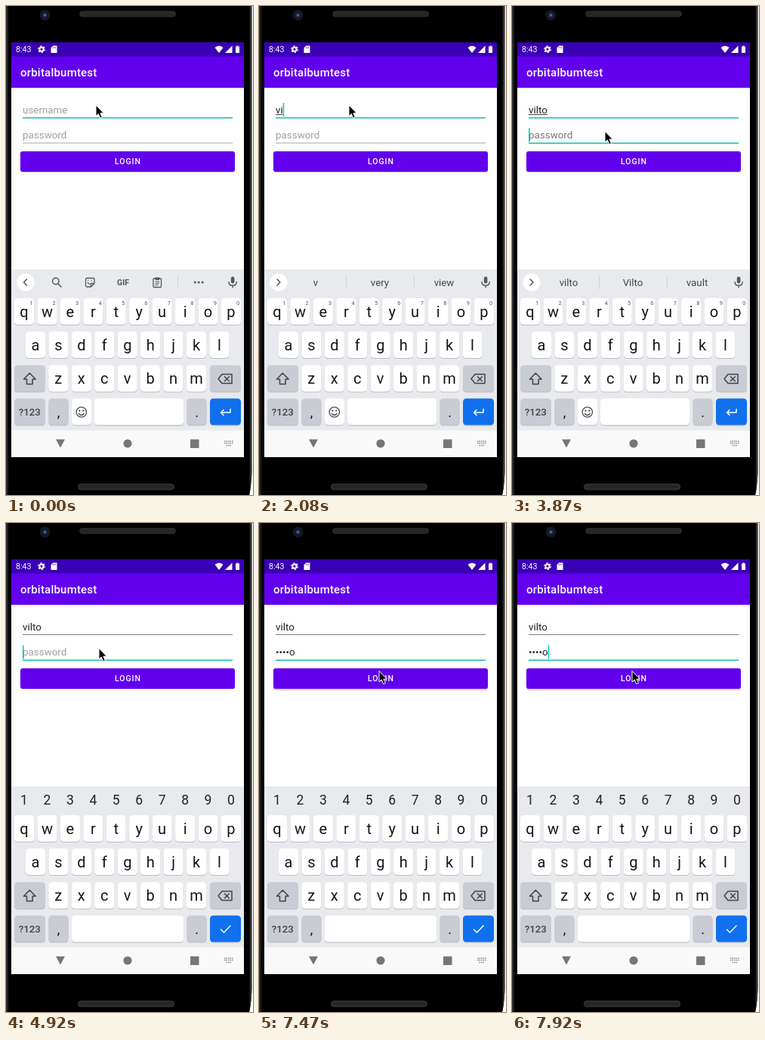
Write an HTML page that moves like this. It is 327x646 px and loops after 8 s.

```html
<!DOCTYPE html>
<html lang="en">
<head>
<meta charset="utf-8">
<title>Login</title>
<style>
  html, body { margin: 0; width: 100%; height: 100%; overflow: hidden; background: #fff; }
  svg { display: block; width: 327px; height: 646px; font-family: Roboto, "Open Sans", sans-serif; }
  .line { fill: none; stroke-linecap: round; stroke-linejoin: round; }
</style>
</head>
<body>
<svg id="stage" viewBox="0 0 327 646" xmlns="http://www.w3.org/2000/svg">
  <defs>
    <linearGradient id="edge">
      <stop offset="0" stop-color="#050505"/>
      <stop offset=".6" stop-color="#3c3c3e"/>
      <stop offset="1" stop-color="#8c8c8e"/>
    </linearGradient>
    <linearGradient id="rim">
      <stop offset="0" stop-color="#3a3a3c"/>
      <stop offset="1" stop-color="#000"/>
    </linearGradient>
    <radialGradient id="lens">
      <stop offset="0" stop-color="#7d9be0"/>
      <stop offset=".35" stop-color="#2b3f7c"/>
      <stop offset="1" stop-color="#0c1020"/>
    </radialGradient>
    <pattern id="mesh" width="2" height="2" patternUnits="userSpaceOnUse">
      <rect width="2" height="2" fill="#2b2b2b"/>
      <rect width="1" height="1" fill="#191919"/>
    </pattern>
  </defs>

  <!-- phone body -->
  <path d="M0 0H326V606Q325 634 322 646H0Z" fill="#000"/>
  <path d="M322 0H326V606Q325 634 322 646Z" fill="url(#edge)"/>
  <rect width="4" height="646" fill="url(#rim)"/>
  <rect x="97.500" y="7" width="127" height="7" rx="3.500" fill="url(#mesh)" stroke="#333" stroke-width=".8"/>
  <rect x="95.500" y="631.500" width="127" height="7.500" rx="3.700" fill="url(#mesh)" stroke="#444" stroke-width=".8"/>
  <circle cx="51.500" cy="12" r="7" fill="#17181c"/>
  <circle cx="51.500" cy="12" r="4" fill="url(#lens)"/>

  <!-- screen -->
  <rect x="7" y="48" width="308" height="548" fill="#fefefe"/>
  <rect x="7" y="108" width="308" height="1.500" fill="#000" opacity=".1"/>
  <rect x="7" y="66" width="308" height="42" fill="#6200ee"/>
  <rect x="7" y="48" width="308" height="18.500" fill="#3a00b4"/>
  <g fill="#fff">
    <text x="13" y="61" font-size="10.600">8:43</text>
    <circle cx="47" cy="57.200" r="2.600" fill="none" stroke="#fff" stroke-width="2"/>
    <circle cx="47" cy="57.200" r="4.200" fill="none" stroke="#fff" stroke-width="1.400" stroke-dasharray="2.200 2.200"/>
    <path d="M62.300 52.500H67.500V62H59.500V55.300Z"/>
    <path d="M276.500 55Q282 50.500 287.500 55L282 62Z"/>
    <path d="M299.500 52.500V62H290Z"/>
    <path d="M304 53.500H305.500V52.500H307.500V53.500H309V62H304Z"/>
    <text x="19" y="93" font-size="15" font-weight="500" letter-spacing=".2">orbitalbumtest</text>
  </g>
  <path d="M62 54.300V56M63.800 54.300V56M65.600 54.300V56" stroke="#3a00b4" stroke-width=".7"/>

  <!-- form -->
  <g font-size="13.400">
    <text id="user" x="22" y="141.500"></text>
    <text id="pass" x="22" y="175"></text>
  </g>
  <rect id="spell" x="22" y="143" height="1" fill="#444"/>
  <rect id="userLine" x="22" width="278"/>
  <rect id="passLine" x="22" width="278"/>
  <rect id="caret" width="1.500" height="18" fill="#03cdba"/>
  <rect id="shade" x="19" y="193" width="284" height="27" rx="3" fill="#000" opacity=".16"/>
  <rect x="19" y="192" width="284" height="27" rx="3" fill="#6200ee"/>
  <text x="144" y="209.300" font-size="10.500" font-weight="500" letter-spacing=".95" fill="#fff">LOGIN</text>

  <!-- keyboard -->
  <rect x="7" y="348" width="308" height="213" fill="#e8eaed"/>
  <g id="keys"></g>
  <g id="textKeys">
    <g class="line" stroke="#4a4d51" stroke-width="1.300">
      <circle cx="99.800" cy="536.500" r="6.700"/>
      <path d="M96.300 538.500Q99.800 542.500 103.300 538.500"/>
      <path d="M97.400 534.300V534.700M102.200 534.300V534.700" stroke-width="2"/>
    </g>
    <path class="line" d="M297 532.500V537H284.500M288 533.500L284.500 537L288 540.500" stroke="#fff" stroke-width="1.500"/>
    <circle cx="26" cy="365" r="11.500" fill="#fff"/>
    <path id="chevron" class="line" stroke="#444" stroke-width="1.300"/>
    <g fill="#55585c">
      <rect x="297.800" y="357.500" width="4.600" height="9" rx="2.300"/>
      <path class="line" d="M295 364.500Q295 369.300 300.100 369.300T305.200 364.500M300.100 369.500V372" stroke="#55585c" stroke-width="1.400"/>
    </g>
  </g>
  <g id="tools" fill="#55585c">
    <g class="line" stroke="#55585c" stroke-width="1.500">
      <circle cx="65.800" cy="363.500" r="4.200"/>
      <path d="M69 367L73 371"/>
      <path d="M107 359.500H115.500Q117 359.500 117 361V366.500L112.500 371H107Q105.500 371 105.500 369.500V361Q105.500 359.500 107 359.500ZM117 366.500H112.500V371" stroke-width="1.300"/>
      <path d="M108.300 365.500Q109.500 367.500 111.500 367M108.800 362.500V362.700M113.300 362.500V362.700" stroke-width="1.200"/>
      <rect x="195" y="360" width="10.500" height="11.500" rx="1" stroke-width="1.300"/>
      <path d="M197.800 364H202.700M197.800 366.300H202.700M197.800 368.600H201" stroke-width="1"/>
    </g>
    <rect x="197.300" y="358.500" width="6" height="3.500" rx="1"/>
    <text x="155" y="368.700" font-size="10.500" font-weight="700" text-anchor="middle">GIF</text>
    <rect x="227" y="356.500" width="1" height="17" fill="#d0d2d6"/>
    <circle cx="250.300" cy="365" r="1.500"/><circle cx="255.200" cy="365" r="1.500"/><circle cx="260.100" cy="365" r="1.500"/>
  </g>
  <g id="hints" font-size="13.300" fill="#45484c" text-anchor="middle">
    <rect x="115" y="356" width="1" height="18" fill="#d0d2d6"/>
    <rect x="205" y="356" width="1" height="18" fill="#d0d2d6"/>
    <text x="75" y="370"></text><text x="160" y="370"></text><text x="245" y="370"></text>
  </g>
  <g id="digits" font-size="17.500" fill="#222" text-anchor="middle"></g>
  <path id="check" class="line" d="M284.500 537L288.500 541L297 532" stroke="#fff" stroke-width="1.500"/>

  <!-- navigation -->
  <rect x="7" y="560.500" width="308" height="35.500" fill="#f9f9fa"/>
  <g fill="#747678">
    <path d="M66 572.500H78L72 583.500Z"/>
    <circle cx="161" cy="578" r="5.600"/>
    <rect x="244" y="572.500" width="11.500" height="11.500" rx=".6"/>
    <path d="M289 575H300.500M289 577.500H300.500M291.500 580.500H298" stroke="#888" stroke-width="1.500" stroke-dasharray="1.500 1"/>
  </g>

  <path id="mouse" d="M0 0V14.500L3.300 11.500L5.700 17.200L8.300 16.100L5.900 10.600H10.400Z" fill="#000" stroke="#fff" stroke-width="1"/>
</svg>
<script>
const LOOP = 8000;
const TEAL = "#1bbcab";
const NAME = "vilto";
const DOT = "\u2022";
const PITCH = 30.44;
const $ = id => document.getElementById(id);

function add(parent, tag, attrs, text) {
  const el = document.createElementNS("http://www.w3.org/2000/svg", tag);
  set(el, attrs);
  if (text) el.textContent = text;
  parent.appendChild(el);
  return el;
}
function set(el, attrs) {
  for (const k in attrs) el.setAttribute(k, attrs[k]);
}
const show = (el, on) => el.setAttribute("visibility", on ? "visible" : "hidden");

function key(x, y, w, fill = "#fff", parent = $("keys")) {
  add(parent, "rect", { x, y: y + 1, width: w, height: 35, rx: 4.5, fill: "#b9bcc1" });
  add(parent, "rect", { x, y, width: w, height: 35, rx: 4.5, fill });
}
function label(x, y, text, size = 20, fill = "#151515", weight = 400) {
  add($("keys"), "text", { x, y, "font-size": size, fill, "font-weight": weight, "text-anchor": "middle" }, text);
}

function buildKeys() {
  const sup = add($("textKeys"), "g", { "font-size": 7.6, fill: "#55585c", "text-anchor": "middle" });
  [["qwertyuiop", 24, 386], ["asdfghjkl", 39, 430], ["zxcvbnm", 69.3, 474.5]].forEach(([row, x0, y], r) => {
    [...row].forEach((ch, i) => {
      const x = x0 + i * PITCH;
      key(x - 13, y, 26);
      label(x, y + 24.5, ch);
      if (r) return;
      const digit = (i + 1) % 10;
      add(sup, "text", { x: x + 9.3, y: 395 }, String(digit));
      add($("digits"), "text", { x, y: 372 }, String(digit));
    });
  });
  const grey = "#c9ccd2";
  key(11, 474.5, 41, grey);
  key(270, 474.5, 41, grey);
  key(11, 518.5, 41, grey);
  key(56.5, 518.5, 26, grey);
  key(87, 518.5, 148);
  key(239.5, 518.5, 26, grey);
  key(270, 518.5, 41, "#1070ee");
  label(31.3, 541, "?123", 13.3, "#404347", 500);
  label(69.5, 543, ",", 18);
  label(252.5, 543, ".", 18);
  const icon = { class: "line", stroke: "#404347", "stroke-width": 1.5 };
  add($("keys"), "path", { ...icon, d: "M31.3 485L23.500 493H27.500V499.500H35.100V493H39.100Z" });
  add($("keys"), "path", { ...icon, d: "M286 486.500H299V498.500H286L281 492.500ZM289.500 489.700L295.300 495.500M295.300 489.700L289.500 495.500" });
  // gap between emoji key and short space bar
  const gap = document.createElementNS("http://www.w3.org/2000/svg", "g");
  $("textKeys").prepend(gap);
  add(gap, "rect", { x: 86, y: 518, width: 40, height: 37, fill: "#e8eaed" });
  key(87, 518.5, 26, "#fff", gap);
  key(117, 518.5, 118, "#fff", gap);
}

// last entry whose start time has passed
const at = (steps, t) => steps.reduce((v, [start, next]) => t >= start ? next : v, steps[0][1]);

const typed = [[0, 0], [1930, 1], [2080, 2], [2530, 3], [2680, 4], [2830, 5]];
const secret = [[0, 0], [5820, 1], [6120, 2], [6270, 3], [6420, 4], [6870, 5]];
const words = [
  [0, ""], [2080, "v very view"], [2230, "vi via visit"],
  [2680, "vol Vol volt"], [2980, "volt Volt volts"], [3130, "vilto Vilto vault"]
];
const caretOn = [
  [0, false], [440, true], [1030, false], [1480, true], [3420, false], [3870, true],
  [4470, false], [4920, true], [5370, false], [5820, true], [7320, false], [7770, true]
];
const mouse = [[0, [119, 131]], [3420, [121, 150]], [3570, [123, 165.5]], [7320, [141, 180]], [7470, [159, 195.5]]];

function field(el, text, hint, hintFill) {
  el.textContent = text || hint;
  el.setAttribute("fill", text ? "#222" : hintFill);
  return text ? el.getComputedTextLength() : 0;
}

function draw(t) {
  const onPass = t >= 3870;
  const secure = t >= 4020;
  const n = at(secret, t);
  const userW = field($("user"), NAME.slice(0, at(typed, t)), "username", "#a0a0a0");
  const passW = field($("pass"), n ? DOT.repeat(n - 1) + NAME[n - 1] : "", "password",
    onPass && t < 4920 ? "#777" : "#a0a0a0");

  set($("spell"), { width: secure ? 0 : userW });
  set($("userLine"), { y: 147, height: secure ? 1 : 1.5, fill: secure ? "#808080" : TEAL });
  set($("passLine"), { y: 180.5, height: onPass ? 1.5 : 1, fill: onPass ? TEAL : "#a8a8a8" });
  set($("caret"), { x: 22 + (onPass ? passW : userW), y: onPass ? 161.500 : 128 });
  show($("caret"), at(caretOn, t));
  set($("shade"), { y: t >= 7470 ? 194 : 193 });

  const list = at(words, t).split(" ");
  const suggest = list.length > 1 && !secure;
  document.querySelectorAll("#hints text").forEach((el, i) => { el.textContent = list[i] || ""; });
  show($("hints"), suggest);
  show($("tools"), !suggest && !secure);
  show($("textKeys"), !secure);
  show($("digits"), secure);
  show($("check"), secure);
  set($("chevron"), { d: suggest ? "M24 361L28 365L24 369" : "M27.500 361L23.500 365L27.500 369" });
  set($("mouse"), { transform: `translate(${at(mouse, t)})` });
}

buildKeys();
const begin = performance.now();
function tick() {
  draw((performance.now() - begin) % LOOP);
  requestAnimationFrame(tick);
}
tick();
</script>
</body>
</html>
```
